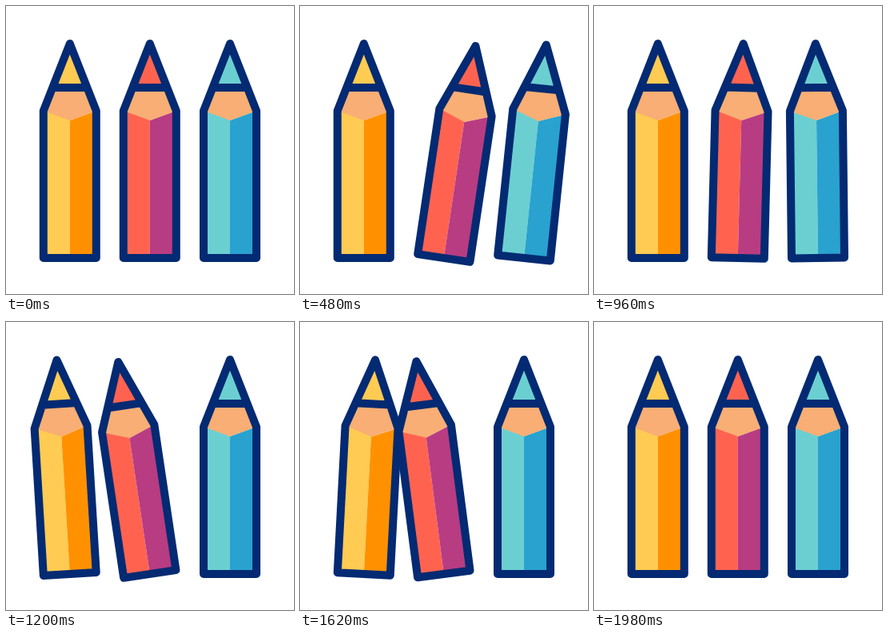
An HTML page that plays this animation: 360x360 px, repeating every 2.04 s.

```html
<!DOCTYPE html>
<html lang="en">
<head>
<meta charset="utf-8">
<title>Pencils</title>
<style>
html, body { margin: 0; height: 100%; overflow: hidden; background: #fff; }
svg { display: block; width: 100%; height: 100%; }
</style>
</head>
<body>
<svg id="stage" viewBox="0 0 360 360"></svg>
<script>
const LOOP = 2040;
const swing = u => (1 - Math.cos(Math.PI * u)) / 2;
const knock = u => Math.sin(Math.PI * u / 2);

// Each key: time in ms, lean in degrees, easing used to get there.
const pencils = [
  { x: 79.8, light: '#ffcb52', dark: '#ff9100', keys: [
    [0, 0], [1120, 0], [1383, -7.6, knock], [1640, 3.2], [1790, 0], [LOOP, 0]] },
  { x: 179.8, light: '#ff6350', dark: '#b83c82', keys: [
    [0, 0], [360, 8.5], [760, 8.5], [1210, -8.5], [1530, -8.5], [1910, 0], [LOOP, 0]] },
  { x: 280, light: '#6bcfd1', dark: '#29a2cf', keys: [
    [0, 0], [240, 0], [620, 7.1, knock], [635, 7.1], [880, -3.1], [995, 0], [LOOP, 0]] }
];

// The origin of a pencil is the middle of its base, where it pivots.
stage.innerHTML = pencils.map(p => `<g>
  <path fill="${p.light}" d="M-33 0V-184L0-268V0Z"/>
  <path fill="${p.dark}" d="M0 0V-172L33-184V0Z"/>
  <path fill="${p.light}" d="M0-268L22-213H-22Z"/>
  <path fill="#f8ae74" d="M-22-213H22L33-184L0-172L-33-184Z"/>
  <path fill="none" stroke="#032a72" stroke-width="10" stroke-linejoin="round"
    d="M-33 0V-184L0-268L33-184V0ZM-21.6-213H21.6"/>
</g>`).join('');
const groups = [...stage.children];

function lean(keys, t) {
  const i = keys.findIndex(k => k[0] > t);
  const [t0, a] = keys[i - 1];
  const [t1, b, ease = swing] = keys[i];
  return a + (b - a) * ease((t - t0) / (t1 - t0));
}

// Steps of 30 ms; every sixth step is held twice as long.
function stepTime(ms) {
  const t = Math.floor(ms % LOOP / 30) * 30;
  return t > 30 && t % 180 === 30 ? t - 30 : t;
}

const start = performance.now();
function draw() {
  const t = stepTime(performance.now() - start);
  pencils.forEach((p, i) => groups[i].setAttribute('transform',
    `translate(${p.x} 315) rotate(${lean(p.keys, t)})`));
  requestAnimationFrame(draw);
}
draw();
</script>
</body>
</html>
```
